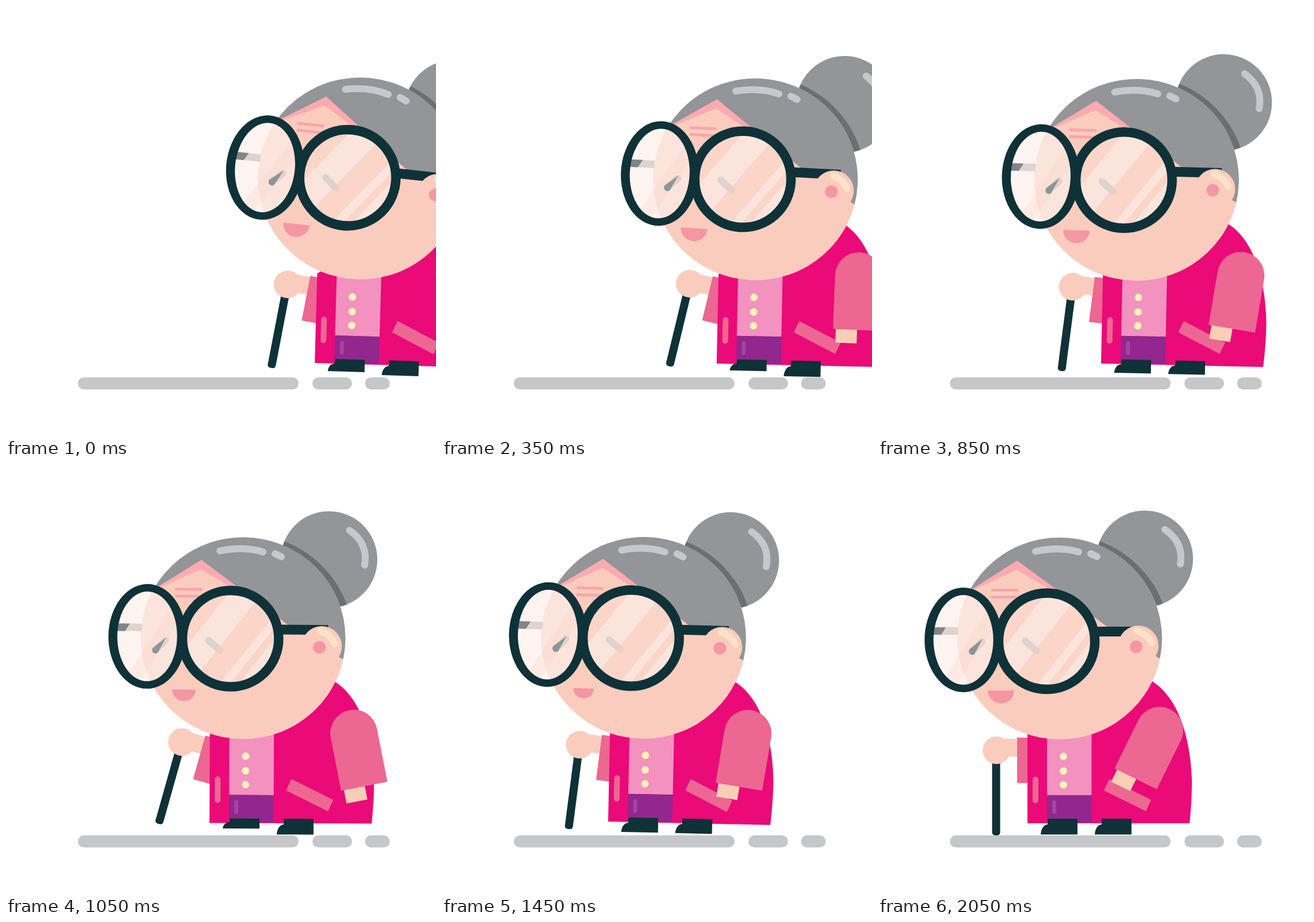
Recreate the animation shown at these times as an HTML page. Size 748 by 748 pixels, loop 3000 ms.

```html
<!DOCTYPE html>
<html lang="en">
<head>
<meta charset="utf-8">
<title>Granny walking</title>
<style>
  html, body { margin: 0; width: 100%; height: 100%; overflow: hidden; background: #fff; }
  svg { display: block; width: 100%; height: 100%; }
  .dark { fill: #0f3138; }
  .skin { fill: #faccbd; }
  .jacket { fill: #ea0a78; }
  .sleeve { fill: #ec6791; }
  .hair { fill: #939598; }
  .parting { fill: #fbaab0; }
  .blush { fill: #f596a3; }
  .lens { fill: #fdeee9; fill-opacity: .7; }
  .tint { fill: #faccbc; fill-opacity: .6; }
  .line { fill: none; stroke-width: 12; stroke-linecap: round; }
  .shine { stroke: #c7c8cd; }
  .eye { stroke: #939598; }
  .wrinkle { stroke: #f9a5ad; stroke-width: 5; }
</style>
</head>
<body>
<svg viewBox="0 0 748 748">
  <defs>
    <clipPath id="skull"><ellipse cx="316" cy="303.5" rx="178" ry="175.5"/></clipPath>
    <clipPath id="bunClip"><circle cx="464" cy="165" r="84"/></clipPath>
    <clipPath id="nearLens"><circle cx="293.5" cy="308.3" r="77"/></clipPath>
    <clipPath id="farLens"><ellipse cx="148.5" cy="306" rx="53" ry="79"/></clipPath>
    <path id="shoe" d="M347 617V644.5H283C284 634 288 628 295 627V617Z"/>
  </defs>

  <g fill="#c5c7c9">
    <rect x="125" y="646" width="384" height="21" rx="10.5"/>
    <rect x="533" y="646" width="69" height="21" rx="10.5"/>
    <rect x="624.5" y="646" width="43" height="21" rx="10.5"/>
  </g>

  <g id="granny">
    <g id="body">
      <g id="caneArm">
        <rect class="dark" x="198.5" y="500" width="14" height="146" rx="5"/>
        <rect class="skin" x="206" y="478" width="40" height="31"/>
        <circle class="skin" cx="206" cy="498" r="24"/>
        <rect class="sleeve" x="242" y="476" width="32" height="79"/>
      </g>
      <path class="jacket" d="M260 469L275 460L470 374C520 400 543 470 546 550C546 580 544 605 542 625H260Z"/>
      <rect x="294" y="440" width="77.5" height="136" fill="#f391bf"/>
      <rect x="294" y="576" width="77.5" height="48" fill="#92278f"/>
      <rect x="303" y="585" width="7" height="24" rx="3.5" fill="#a5439f"/>
      <rect class="sleeve" x="269" y="544" width="10" height="46" rx="5"/>
      <g fill="#fff3b8">
        <circle cx="322.5" cy="508.5" r="6.5"/>
        <circle cx="322.5" cy="534" r="6.5"/>
        <circle cx="322.5" cy="558" r="6.5"/>
      </g>
      <path class="sleeve" d="M402 548L475 584L466 604L393 568Z"/>
      <use id="shoeL" href="#shoe" class="dark"/>
      <use id="shoeR" href="#shoe" class="dark"/>
    </g>

    <g id="arm">
      <rect x="-36" y="90" width="37" height="27.5" fill="#f8cfb6"/>
      <path class="sleeve" d="M-41 94V0A41 41 0 0 1 41 0V94Z"/>
    </g>

    <g id="head">
      <circle class="hair" cx="464" cy="165" r="84"/>
      <ellipse cx="318" cy="306" rx="189" ry="184" fill="#6d6e71" clip-path="url(#bunClip)"/>
      <path class="line shine" d="M499 114Q532 136 526 174"/>
      <ellipse class="skin" cx="316" cy="303.5" rx="178" ry="175.5"/>
      <g clip-path="url(#skull)">
        <path class="parting" d="M145 229L242 168L366 258L241 184Z"/>
        <path class="hair" d="M130 239L242 168L400 284L440 300L484 335L496 341V100H130Z"/>
      </g>
      <path class="line shine" d="M274 152Q315 143 349 153M370 156L381 161"/>
      <path class="line wrinkle" d="M199 219.5H242M199 231.5H242"/>
      <path class="line eye" d="M256 308L276 325M181 309L164 326"/>
      <path id="mouth" class="blush" d="M-23 0H23A23 22.500 0 0 1 -23 0Z"/>

      <g id="glasses">
        <rect class="hair" x="95" y="284" width="44" height="13"/>
        <rect class="dark" x="378" y="283" width="85" height="17"/>
        <ellipse class="lens" cx="148.5" cy="306" rx="53" ry="79"/>
        <circle class="lens" cx="293.5" cy="308.3" r="77"/>
        <g clip-path="url(#nearLens)">
          <g class="tint" transform="translate(293.5 308.3) rotate(38)">
            <rect x="-90" y="-100" width="38" height="200"/>
            <rect x="-6" y="-100" width="40" height="200"/>
            <rect x="48" y="-100" width="12" height="200"/>
          </g>
        </g>
        <g clip-path="url(#farLens)">
          <g class="tint" opacity=".4" transform="translate(148.5 306) rotate(32)">
            <rect x="8" y="-100" width="24" height="200"/>
          </g>
        </g>
        <path d="M95 284H118L110 297H95Z" fill="#808589"/>
        <path class="dark" fill-rule="evenodd" d="M81 306a67.5 91 0 0 1 135 0a67.5 91 0 0 1 -135 0ZM96.500 306a52 78 0 0 0 104 0a52 78 0 0 0 -104 0Z"/>
        <circle cx="293.5" cy="308.3" r="83.7" fill="none" stroke="#0f3138" stroke-width="16.5"/>
      </g>
      <path d="M182 304L160 321.500A6 6 0 0 0 168 330.500Z" fill="#8b9598"/>

      <circle class="skin" cx="453" cy="316" r="35"/>
      <path class="line" stroke="#fde2c6" d="M450 290Q467 294 476 311"/>
      <circle class="blush" cx="449" cy="318" r="11"/>
    </g>
  </g>
</svg>
<script>
  const LOOP = 3000, TICK = 50, STRIDE = 600;
  const PLANT = 1250, STOP = 1650, REST = 2050;
  const { sin, cos, min, max, PI } = Math;

  // Eased progress from 0 to 1 between two times.
  function ramp(t, from, to) {
    const k = min(1, max(0, (t - from) / (to - from)));
    return k * k * (3 - 2 * k);
  }
  const mix = (a, b, k) => a + (b - a) * k;
  const phase = t => 2 * PI * t / STRIDE;

  // The pace changes a little at a few points of the way.
  const way = [[0, 277], [650, 167], [850, 128], [PLANT, 60], [STOP, -2], [REST, 0]];
  function walkX(t) {
    const i = max(1, way.findIndex(([time]) => t <= time));
    const [t0, a] = way[i - 1], [t1, b] = way[i];
    return mix(a, b, (t - t0) / (t1 - t0));
  }

  // Body and head rock twice per stride, never tipping forward past upright.
  const bodyTilt = p => max(0, 0.53 - 0.1 * cos(p) - 0.83 * sin(p) + 1.16 * cos(2 * p) - 0.48 * sin(2 * p));
  const headTilt = p => max(0, 1.97 + 1.3 * cos(p) - 1.5 * sin(p) + 2.83 * cos(2 * p));

  const swing = t => -3.8 + 13.4 * cos(phase(t - 245));

  const move = (id, transform) => document.getElementById(id).setAttribute("transform", transform);

  function moveShoe(id, x, height) {
    move(id, `translate(${x} 617) scale(1 ${height}) translate(0 -617)`);
  }

  function draw(t) {
    const p = phase(min(t, STOP));
    const step = sin(phase(min(t, PLANT)));
    const land = ramp(t, PLANT, STOP);
    const walk = 1 - ramp(t, STOP, REST);
    const swingEnd = STOP + 95;
    const arm = mix(swing(min(t, swingEnd)), 26.3, ramp(t, swingEnd, REST));
    const smile = 1 - 0.22 * (ramp(t, 850, PLANT) - ramp(t, STOP, REST));

    move("granny", `translate(${walkX(t)} 0)`);
    move("body", `rotate(${bodyTilt(p) * walk} 403 625)`);
    move("caneArm", `rotate(${(9.3 - 6.2 * step) * walk} 259 512)`);
    moveShoe("shoeL", 0, mix(0.78 + 0.15 * step, 1, land));
    moveShoe("shoeR", 94, mix(min(1, 0.94 - 0.15 * step), 1, land));
    move("arm", `translate(${508 - 0.4 * arm - 0.011 * arm * arm} ${469.5 - 0.009 * arm * arm}) rotate(${arm})`);
    move("head", `rotate(${headTilt(p) * walk} 360 520)`);
    move("mouth", `translate(214 394) scale(${smile})`);
    move("glasses", `translate(${0.7 * walk} ${-3.8 * walk})`);
  }

  const start = performance.now();
  function frame() {
    const t = (performance.now() - start) % LOOP;
    draw(min(Math.floor(t / TICK) * TICK, REST));
    requestAnimationFrame(frame);
  }
  frame();
</script>
</body>
</html>
```
